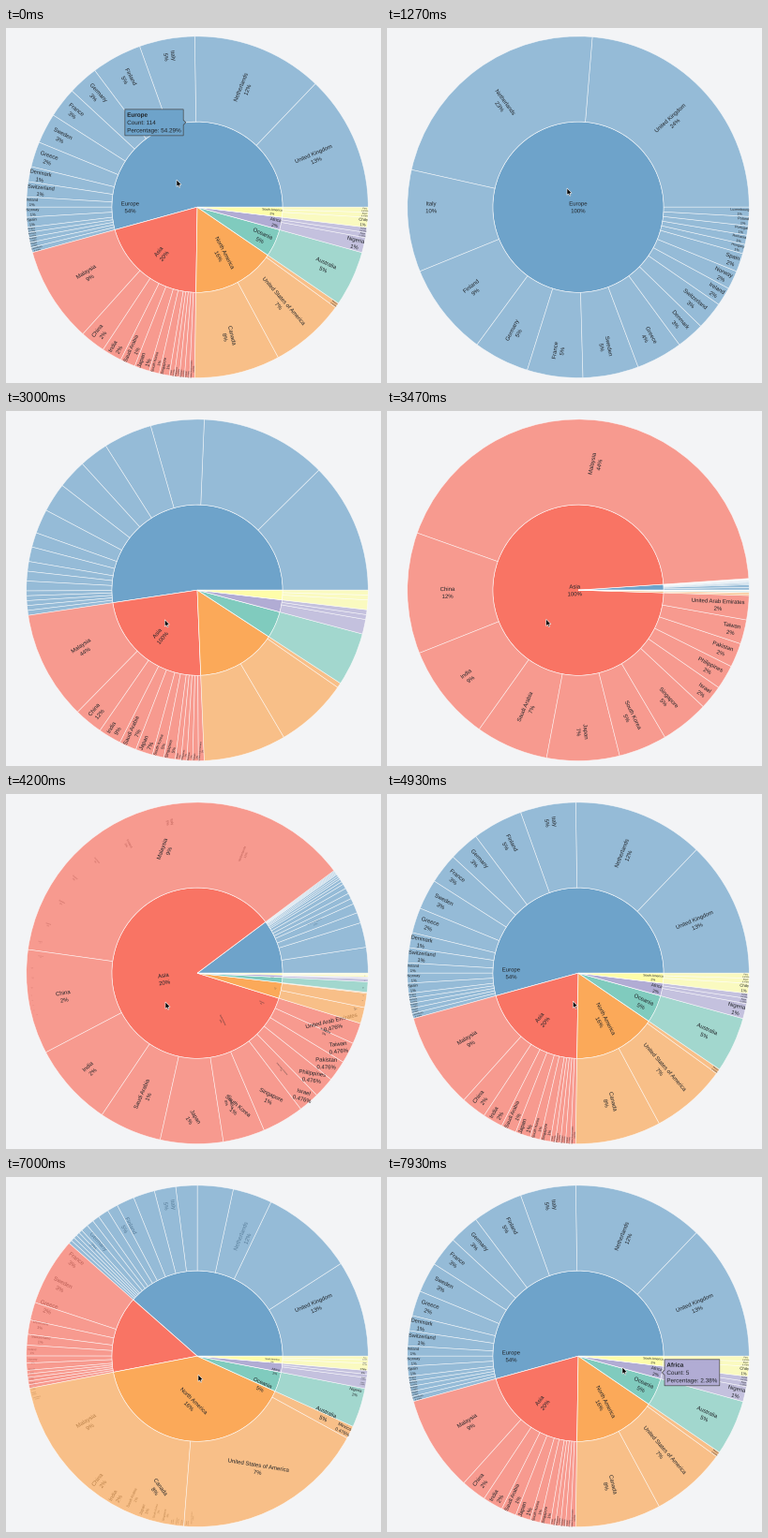
Animation of 400x379 px, one loop 8 s. Source, as a matplotlib script:

```python
import numpy as np
import matplotlib.pyplot as plt
from matplotlib.animation import FuncAnimation
from matplotlib.patches import PathPatch, Polygon, Wedge
from matplotlib.path import Path
from matplotlib.textpath import TextPath
from matplotlib.transforms import Affine2D

W, H, DPI = 400, 379, 100
LOOP, STEP = 8000, 40
CX, CY, R = 204, H - 191.2, 182.3
FONT, PITCH, INK = 6.0, 7.8, "#1f2226"
ZOOM_MS = 750

REGIONS = [
    ("Europe", "#6ea3ca", [
        ("United Kingdom", 27), ("Netherlands", 26), ("Italy", 11), ("Finland", 10),
        ("Germany", 6), ("France", 6), ("Sweden", 6), ("Greece", 5), ("Denmark", 3),
        ("Switzerland", 3), ("Ireland", 2), ("Norway", 2), ("Spain", 2), ("Hungary", 1),
        ("Romania", 1), ("Portugal", 1), ("Poland", 1), ("Luxembourg", 1)]),
    ("Asia", "#f97464", [
        ("Malaysia", 19), ("China", 5), ("India", 4), ("Saudi Arabia", 3), ("Japan", 3),
        ("South Korea", 2), ("Singapore", 2), ("Israel", 1), ("Philippines", 1),
        ("Pakistan", 1), ("Taiwan", 1), ("United Arab Emirates", 1)]),
    ("North America", "#fba959", [
        ("Canada", 17), ("United States of America", 15), ("Mexico", 1)]),
    ("Oceania", "#80cbbe", [("Australia", 11)]),
    ("Africa", "#b1acd4", [("Nigeria", 3), ("Egypt", 1), ("Kenya", 1)]),
    ("South America", "#fefda9", [("Chile", 2), ("Brazil", 1), ("Peru", 1)]),
]
TOTAL = sum(n for _, _, leaves in REGIONS for _, n in leaves)

# (start ms, region, zooming in?)
CLICKS = [(60, "Europe", True), (1400, "Europe", False),
          (2845, "Asia", True), (3929, "Asia", False),
          (5380, "North America", True), (6563, "North America", False)]
FREEZE = (200, 1266)
TIPS = [(0, 60, "Europe"), (7700, LOOP, "Africa")]
CURSOR = np.array([
    (0, 182, 162), (1250, 182, 162), (1260, 192, 171), (2150, 192, 171),
    (2700, 169, 223), (3700, 170, 222), (4650, 170, 222), (5250, 230, 220),
    (6150, 230, 220), (6500, 205, 211), (7250, 205, 211), (7700, 251, 203),
    (8000, 251, 203)], float)


def text_line(s, x, y, size=FONT, weight="normal", center=True):
    path = TextPath((0, 0), s, size=size, prop={"family": "Liberation Sans", "weight": weight})
    box = path.get_extents()
    dx = x - (box.x0 + box.x1) / 2 if center else x
    return Affine2D().translate(dx, y).transform_path(path), box.width


def percent(ratio):
    whole = int(100 * ratio + 0.5)
    return f"{whole}%" if whole else f"{100 * ratio:.3g}%"


def label_path(name, pct):
    mid = 0.36 * FONT
    top, w1 = text_line(name, 0, PITCH / 2 - mid)
    low, w2 = text_line(pct, 0, -PITCH / 2 - mid)
    return Path.make_compound_path(top, low), max(w1, w2)


def radial_fit(width, ring, half, r):
    """Scale and centre radius of the largest radial label that fits a sector."""
    height = PITCH + 1.15 * FONT
    a = width / height
    q = a + 0.5 / np.tan(np.radians(half))
    b = min(1 / (np.sqrt(q * q + 0.5) + q), ring / (np.sqrt(a * a + ring / 2) + a))
    return 2 * b * (r - 2) / height, np.cos(b) - a * b


class Node:
    def __init__(self, name, region, color, start, count, inner):
        self.name, self.region, self.color = name, region, color
        self.start, self.count, self.inner = start, count, inner
        self.r = R / 2 if inner else R
        self.poses = {}

    def pose(self, focus):
        if focus not in self.poses:
            self.poses[focus] = self.make_pose(focus)
        return self.poses[focus]

    def make_pose(self, focus):
        base, total = SPANS[focus]
        ends = np.array([self.start, self.start + self.count])
        x0, x1 = 360 * np.clip((ends - base) / total, 0, 1)
        pose = dict(x0=x0, x1=x1, shown=focus is None or self.region == focus)
        if not pose["shown"]:
            return pose
        path, width = label_path(self.name, percent(self.count / total))
        pose["path"] = path
        if x1 - x0 > 359.9:
            return dict(pose, angle=180, rc=0, scale=2 * self.r / width, rot=0)
        ring = 1 if self.inner else 0.5
        mid = (x0 + x1) / 2
        scale, rc = radial_fit(width, ring, min((x1 - x0) / 2, 89.9), self.r)
        # A sector that crosses the horizontal gets level text there.
        if x0 < 180 < x1:
            flat = radial_fit(width, ring, min(180 - x0, x1 - 180, 89.9), self.r)
            if flat[0] >= 1:
                mid, (scale, rc) = 180, flat
        return dict(pose, angle=mid, rc=rc, scale=scale, rot=(mid + 90) % 180 - 90)


def build_nodes():
    inner, outer, spans, at = [], [], {None: (0, TOTAL)}, 0
    for name, color, leaves in REGIONS:
        size = sum(n for _, n in leaves)
        spans[name] = (at, size)
        inner.append(Node(name, name, color, at, size, True))
        for leaf, n in leaves:
            outer.append(Node(leaf, name, color, at, n, False))
            at += n
    return inner + outer, spans


NODES, SPANS = build_nodes()

fig = plt.figure(figsize=(W / DPI, H / DPI), dpi=DPI, facecolor="#f3f4f6")
ax = fig.add_axes([0, 0, 1, 1])
ax.set_xlim(0, W)
ax.set_ylim(0, H)
ax.axis("off")

for i, node in enumerate(NODES):
    node.wedge = ax.add_patch(Wedge(
        (CX, CY), node.r, 0, 1, width=None if node.inner else R / 2,
        fc=node.color, ec="white", lw=0.45, alpha=1 if node.inner else 0.7, zorder=i + 1))
    node.text = ax.add_patch(PathPatch(
        node.pose(None)["path"], fc=INK, lw=0, zorder=i + 1.5))


def make_tip(name):
    node = next(n for n in NODES if n.name == name)
    p = node.pose(None)
    mid = np.radians((p["x0"] + p["x1"]) / 2)
    x, y = CX + node.r * np.cos(mid), CY + node.r * np.sin(mid)
    lines = [name, f"Count: {node.count}", f"Percentage: {100 * node.count / TOTAL:.2f}%"]
    size = 6.35
    wide = max(text_line(s, 0, 0, size)[1] for s in lines) + 5.5
    side = -1 if np.cos(mid) < 0 else 1
    near, far = x + 2.6 * side, x + (2.6 + wide) * side
    box = Polygon([(x, y), (near, y + 2.6), (near, y + 14), (far, y + 14),
                   (far, y - 14), (near, y - 14), (near, y - 2.6)],
                  fc=node.color, ec="#444444", lw=0.5, zorder=100)
    left = min(near, far) + 2.3
    paths = [text_line(s, left, y + 8.3 * (1 - k) - 2.2, size,
                       "bold" if k == 0 else "normal", center=False)[0]
             for k, s in enumerate(lines)]
    text = PathPatch(Path.make_compound_path(*paths), fc=INK, lw=0, zorder=101)
    return [ax.add_patch(box), ax.add_patch(text)]


tips = [(a, b, make_tip(name)) for a, b, name in TIPS]

ARROW = np.array([(0, 0), (0, -7.4), (1.7, -5.9), (2.8, -8.3),
                  (3.9, -7.8), (2.9, -5.5), (5.1, -5.3)])
cursor = ax.add_patch(Polygon(ARROW, fc="black", ec="white", lw=0.4, zorder=110))


def ease(u):
    u = min(max(u, 0), 1)
    return 4 * u ** 3 if u < 0.5 else 1 - 4 * (1 - u) ** 3


def view_at(t):
    """Layout left, layout entered, and eased progress between them."""
    view = (None, None, 1)
    for start, region, zoom_in in CLICKS:
        if t >= start:
            p = ease((t - start) / ZOOM_MS)
            view = (None, region, p) if zoom_in else (region, None, p)
    return view


def place(node, before, after, p):
    a, b = node.pose(before), node.pose(after)

    def mix(key, q=p):
        return a[key] + (b[key] - a[key]) * q

    x0, x1 = mix("x0"), mix("x1")
    node.wedge.set_visible(x1 - x0 > 1e-6)
    node.wedge.set_theta1(x0)
    node.wedge.set_theta2(x1)

    node.text.set_visible(b["shown"])
    if not b["shown"]:
        return
    if not a["shown"]:
        a = dict(b, scale=0)
    power = 3 if b["rc"] == 0 else 1 / 3 if a["rc"] == 0 else 1
    r, angle = node.r * mix("rc", p ** power), np.radians(mix("angle"))
    # The fitted scale is mixed first and capped at full size afterwards.
    scale = min(max(mix("scale"), 1e-3), 1)
    node.text.set_path(b["path"])
    node.text.set_transform(
        Affine2D().scale(scale).rotate_deg(mix("rot"))
        .translate(CX + r * np.cos(angle), CY + r * np.sin(angle)) + ax.transData)


def update(k):
    # Poses advance at 15 per second.
    t = int((STEP * k + 30) * 0.015 + 1e-6) * 200 / 3
    x, y = (np.interp(t, CURSOR[:, 0], CURSOR[:, i]) for i in (1, 2))
    cursor.set_xy(ARROW + (x, H - y))
    for a, b, parts in tips:
        for part in parts:
            part.set_visible(a <= t < b)
    if FREEZE[0] < t < FREEZE[1]:
        t = FREEZE[0]
    view = view_at(t)
    for node in NODES:
        place(node, *view)
    return []


anim = FuncAnimation(fig, update, frames=LOOP // STEP, interval=STEP,
                     init_func=lambda: update(0), repeat=True, repeat_delay=0, blit=False)
plt.show()
```
